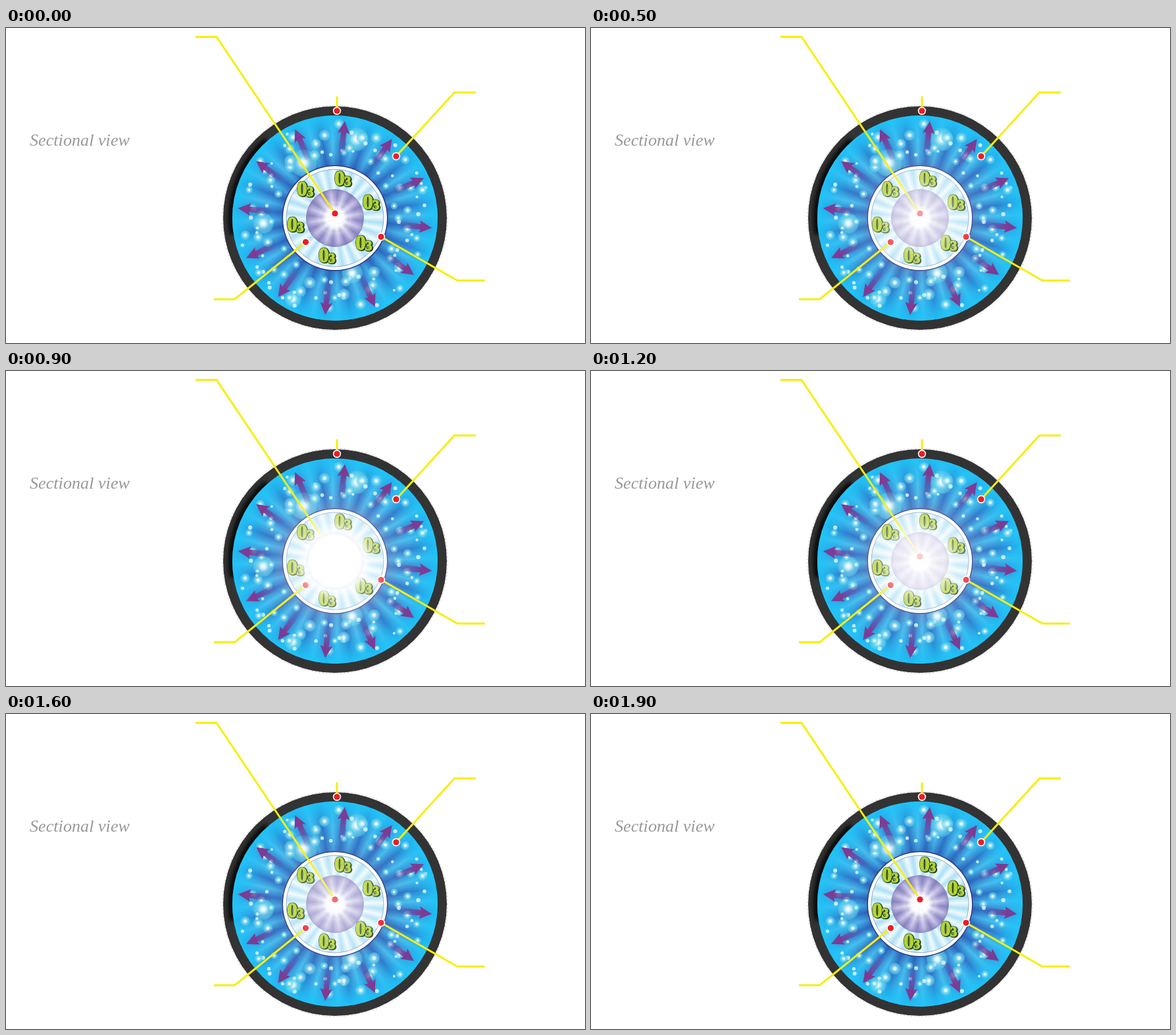
Recreate the animation shown at these times as an HTML page with a canvas. Size 880 by 479 pixels, loop 2000 ms.

```html
<!DOCTYPE html>
<html lang="en">
<head>
<meta charset="utf-8">
<title>Sectional view</title>
<style>
html, body { margin: 0; width: 100%; height: 100%; overflow: hidden; background: #fff; }
canvas, p, #glow { position: absolute; margin: 0; }
canvas { left: 0; top: 0; }
p { left: 36px; top: 155px; font: italic 26.2px/32px "Liberation Serif", serif; color: #999; white-space: nowrap; }
#glow {
  left: 374px; top: 163px; width: 252px; height: 252px; opacity: 0;
  background: radial-gradient(circle closest-side, #fff 30%, rgba(255,255,255,.87) 36%,
    rgba(255,255,255,.48) 46%, rgba(255,255,255,.27) 60%, rgba(255,255,255,.08) 78%, rgba(255,255,255,0));
}
</style>
</head>
<body>
<canvas id="stage" width="880" height="479"></canvas>
<p>Sectional view</p>
<div id="glow"></div>
<script>
const c = document.getElementById('stage').getContext('2d');
const glow = document.getElementById('glow');
const CX = 500, CY = 289, TAU = Math.PI * 2;
const ARROW_TURN = 5.8 * TAU / 360;

let seed = 11;
const rnd = () => (seed = seed * 16807 % 2147483647) / 2147483647;
const polar = (r, a) => [CX + r * Math.cos(a), CY + r * Math.sin(a)];

function disc(x, y, r, fill) {
  c.beginPath();
  c.arc(x, y, r, 0, TAU);
  c.fillStyle = fill;
  c.fill();
}
function ring(r, width, color, from = 0, to = TAU) {
  c.beginPath();
  c.arc(CX, CY, r, from, to);
  c.lineWidth = width;
  c.strokeStyle = color;
  c.stroke();
}
function radial(x, y, r0, r1, ...stops) {
  const g = c.createRadialGradient(x, y, r0, x, y, r1);
  stops.forEach(([at, color]) => g.addColorStop(at, color));
  return g;
}
function rays(n, dark, light) {
  const g = c.createConicGradient(ARROW_TURN, CX, CY);
  for (let i = 0; i <= 2 * n; i++) g.addColorStop(i / (2 * n), i % 2 ? light : dark);
  return g;
}

function shell() {
  c.setLineDash([1.5, 4]);
  ring(171, .7, '#888');
  c.setLineDash([]);
  disc(CX, CY, 170, '#333');
  c.filter = 'blur(3px)';
  ring(158, 7, '#000', Math.PI * .95, Math.PI * 1.27);
  c.filter = 'none';
}

function water() {
  disc(CX, CY, 156, rays(24, '#2f6fc4', '#4cc3f0'));
  disc(CX, CY, 156, radial(CX, CY, 80, 156, [0, 'rgba(40,75,165,.45)'], [.3, 'rgba(40,130,210,.12)'],
    [.5, 'rgba(32,185,242,.2)'], [.8, 'rgba(32,192,246,.7)'], [1, 'rgba(30,196,248,.95)']));
}

function bubble(x, y, r) {
  disc(x, y, r, radial(x, y, 0, r, [0, '#fff'], [.22, 'rgba(235,252,255,.9)'],
    [.55, 'rgba(130,222,240,.68)'], [.9, 'rgba(85,203,234,.62)'], [1, 'rgba(60,180,225,.5)']));
}

function bubbles() {
  [[452, 205, 21], [391, 297, 16], [533, 169, 18], [526, 373, 16], [436, 412, 13]].forEach(b => bubble(...b));
  const count = 58;
  for (let i = 0; i < count; i++) {
    const a = (i + rnd()) / count * TAU;
    bubble(...polar(90 + (i % 4 + rnd()) * 14, a), 5 + rnd() * 4);
    disc(...polar(95 + rnd() * 52, a + .06), 2 + rnd() * 1.3, 'rgba(218,247,255,.85)');
  }
}

function arrows() {
  const g = c.createLinearGradient(0, -98, 0, -132);
  g.addColorStop(0, 'rgba(110,65,160,.1)');
  g.addColorStop(1, '#7d3b94');
  for (let i = 0; i < 12; i++) {
    c.save();
    c.translate(CX, CY);
    c.rotate(ARROW_TURN + i * TAU / 12);
    c.fillStyle = g;
    c.beginPath();
    [[0, -148], [9.5, -129], [4, -131], [5, -98], [-5, -98], [-4, -131], [-9.5, -129]]
      .forEach(p => c.lineTo(...p));
    c.fill();
    c.restore();
  }
}

function core() {
  disc(CX, CY, 80.5, '#243a86');
  disc(CX, CY, 79, '#fff');
  disc(CX, CY, 74, rays(24, '#aee0f5', '#f0faff'));
  ring(74, .8, '#6d94bd');
  disc(CX, CY, 43.5, rays(12, '#8280bb', '#d3cfec'));
  disc(CX, CY, 43.5, radial(CX, CY, 12, 43.5, [0, 'rgba(255,255,255,.9)'],
    [.35, 'rgba(235,232,250,.5)'], [.7, 'rgba(170,160,215,.2)'], [1, 'rgba(125,115,185,.55)']));
  ring(43.5, .8, '#8086b8');
  disc(CX, CY, 22, radial(CX, CY, 8, 22, [0, '#fff'], [.4, '#f3f2fc'], [.75, '#c9c8e8'], [1, '#a8a8d6']));
  disc(CX, CY, 22, rays(12, 'rgba(255,255,255,0)', 'rgba(255,255,255,.6)'));
  disc(CX, CY, 17, radial(CX, CY, 6, 17, [0, '#fff'], [1, 'rgba(255,255,255,0)']));
}

function glyph(text, size, x, y) {
  c.font = `bold ${size}px "Liberation Serif", serif`;
  c.lineJoin = 'round';
  c.strokeStyle = '#24451f';
  c.lineWidth = 2.6;
  for (let d = 1.6; d >= 0; d -= .8) c.strokeText(text, x + d, y + d * .6);
  c.fillStyle = c.strokeStyle = '#b4d335';
  c.fillText(text, x, y);
  c.lineWidth = 1.4;
  c.strokeText(text, x, y);
}

function ozone() {
  c.textAlign = 'center';
  [[513, 229], [456, 245], [556, 265], [441, 299], [545, 327], [489, 346]].forEach(([x, y]) => {
    glyph('0', 31, x - 6, y + 10);
    glyph('3', 21, x + 6, y + 11);
  });
}

function pointers() {
  const lines = [
    [[288, 13.5], [320, 13.5], [500, 282]],
    [[503, 104], [503, 126]],
    [[714, 98], [681.5, 98], [593, 195]],
    [[728, 384], [686, 384], [570, 317.5]],
    [[316, 412.5], [347.5, 412.5], [455.5, 325.5]]
  ];
  c.lineWidth = 3;
  c.lineJoin = 'miter';
  c.strokeStyle = '#f7ee0c';
  for (const line of lines) {
    c.beginPath();
    line.forEach(p => c.lineTo(...p));
    c.stroke();
  }
  for (const line of lines) {
    const [x, y] = line[line.length - 1];
    disc(x, y, 6.2, '#fff');
    disc(x, y, 4.6, '#ed1c24');
  }
}

[shell, water, bubbles, arrows, core, ozone, pointers].forEach(draw => draw());

// The light brightens in nine steps, rests, and dims again.
function tick(now) {
  const step = Math.floor(now % 2000 / 100);
  glow.style.opacity = Math.min(step, 19 - step) / 9;
  requestAnimationFrame(tick);
}
requestAnimationFrame(tick);
</script>
</body>
</html>
```
